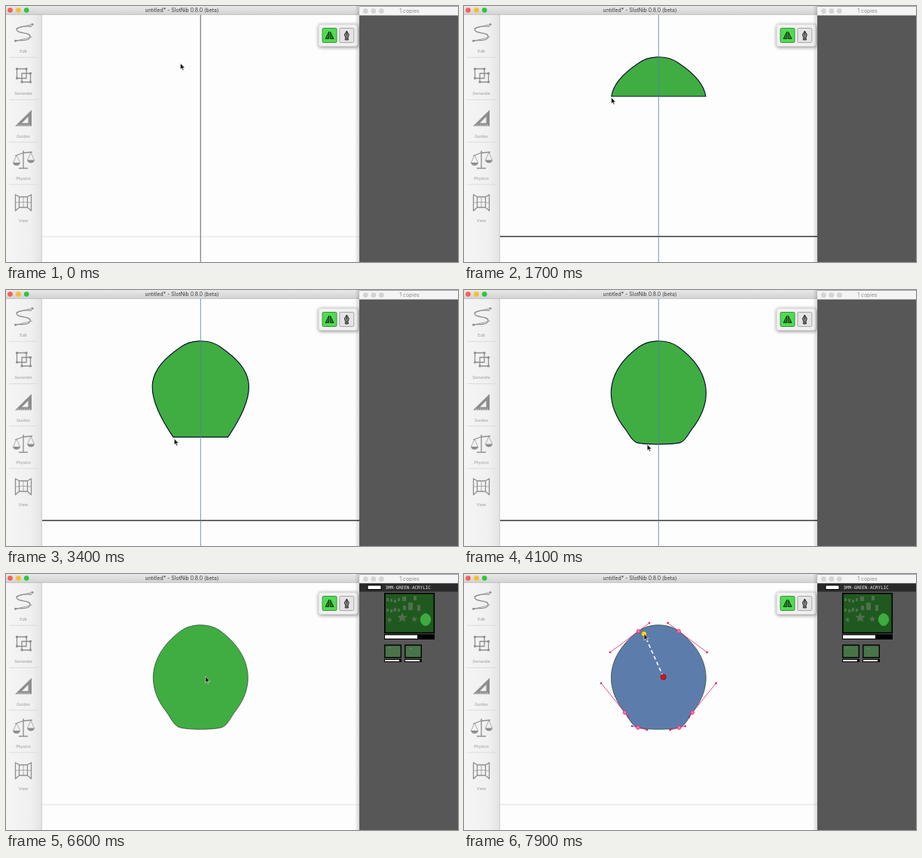
An HTML page for the animation above (8000 ms loop, 600x340 px).

```html
<!DOCTYPE html>
<html lang="en">
<head>
<meta charset="utf-8">
<title>Symmetric sketch</title>
<style>
  html, body { margin: 0; width: 100%; height: 100%; overflow: hidden; background: #fdfdfd; }
  svg { display: block; width: 600px; height: 340px; }
  text { font: 6.9px Inter, sans-serif; text-anchor: middle; }
  .labels text { font-size: 5.4px; fill: #999; }
  .icons { fill: none; stroke: #8e8e8e; stroke-width: 1.3; stroke-linejoin: round; }
  .icons .solid { fill: #8e8e8e; stroke: none; }
  .icons .thin { stroke-width: .7; }
  #stock text { font: 5.9px "DejaVu Sans Mono", monospace; text-anchor: start; fill: #f2f2f2; }
</style>
</head>
<body>
<svg viewBox="0 0 600 340">
  <defs>
    <linearGradient id="bar" x2="0" y2="1"><stop stop-color="#e8e8e8"/><stop offset="1" stop-color="#d2d2d2"/></linearGradient>
    <linearGradient id="side"><stop stop-color="#f5f5f5"/><stop offset=".7" stop-color="#f0f0f0"/><stop offset="1" stop-color="#e4e4e4"/></linearGradient>
    <linearGradient id="shade"><stop stop-color="#000" stop-opacity="0"/><stop offset="1" stop-color="#000" stop-opacity=".16"/></linearGradient>
    <filter id="blur" x="-20%" y="-30%" width="140%" height="160%"><feGaussianBlur stdDeviation="2.5"/></filter>
  </defs>

  <!-- sketch -->
  <rect width="600" height="340" fill="#fdfdfd"/>
  <path id="ground" d="M48 306.2H469"/>
  <path id="shape"/>
  <path id="axis" d="M258.3 11V340"/>
  <g id="handles" stroke="#d8236f" stroke-width=".8"></g>
  <g id="drag">
    <path id="dragLine" stroke="#fff" stroke-width="1.6" stroke-dasharray="5 3.5"/>
    <circle cx="264.7" cy="136.8" r="3.6" fill="#e01010" stroke="#501010" stroke-width=".6"/>
    <circle id="dragEnd" r="3.6" fill="#f4d81c" stroke="#6b5c10" stroke-width=".6"/>
  </g>

  <!-- main window -->
  <rect y="11" width="47" height="329" fill="url(#side)"/>
  <path d="M47.3 11V340" stroke="#c4c4c4" stroke-width=".9"/>
  <path d="M4 68.3H42M4 124.5H42M4 180.8H42M4 237H42" stroke="#d6d6d6" stroke-width=".8"/>
  <g class="labels">
    <text x="23" y="62">Edit</text><text x="23" y="118.2">Generate</text><text x="23" y="174.6">Guides</text>
    <text x="23" y="231">Physics</text><text x="23" y="287.3">View</text>
  </g>
  <g class="icons">
    <path d="M34 27C22 26 11 29 15 33S33 35 32 41 20 45 13 46"/>
    <path class="thin" d="M13 30L35 24M12 46.500L35 41"/>
    <g class="solid"><circle cx="35" cy="24.500" r="1.500"/><circle cx="12.500" cy="46.300" r="1.500"/></g>
    <path d="M14.500 83.500H27V96H14.500ZM21 89.500H32.500V101H21Z"/>
    <g class="solid" id="nodes"></g>
    <path class="solid" fill-rule="evenodd" d="M12 159.500L34 138V159.500ZM21 155.500H29.500V147Z"/>
    <path class="thin" stroke="#f2f2f2" d="M16 159.500V157.500M19 159.500V157.500M22 159.500V157.500M25 159.500V157.500M28 159.500V157.500M31 159.500V157.500"/>
    <path d="M23 192V215M17 215.500H29M12 199L23 195 35 194"/>
    <path class="thin" d="M14 198L9.500 208M14 198L18.500 208M33 194.500L28.500 204.500M33 194.500L37.500 204.500"/>
    <path class="solid" d="M9 208H19Q18 212 14 212T9 208ZM28 204.500H38Q37 208.500 33 208.500T28 204.500Z"/>
    <path d="M17.500 253.500H28.500V267.500H17.500ZM17.500 253.500L12.500 250.500V272L17.500 267.500M28.500 253.500L33.500 250.500V272L28.500 267.500"/>
    <path class="thin" d="M23 253.500V267.500M17.500 260.500H28.500M12.500 261H17.500M28.500 261H33.500"/>
  </g>
  <rect width="469" height="11.300" fill="url(#bar)"/>
  <path d="M0 11.500H469" stroke="#b5b5b5" stroke-width=".7"/>
  <circle cx="5.500" cy="5.600" r="3.300" fill="#f85e56"/>
  <circle cx="16.500" cy="5.600" r="3.300" fill="#fabc2e"/>
  <circle cx="27.200" cy="5.600" r="3.300" fill="#28c83f"/>
  <text x="233.500" y="8.100" fill="#3c3c3c">untitled* - SlotNib 0.8.0 (beta)</text>

  <!-- tool palette -->
  <rect x="415" y="25" width="53" height="30" rx="3" opacity=".45" filter="url(#blur)"/>
  <rect x="415" y="24.500" width="52" height="29" rx="3" fill="#f1f1f1" stroke="#d8d8d8" stroke-width=".6"/>
  <rect x="420" y="29.500" width="19" height="19" rx="1.500" fill="#4fdc52" stroke="#3d8f3f"/>
  <rect x="442.800" y="29.500" width="19" height="19" rx="1.500" fill="#e4e4e4" stroke="#a5a5a5"/>
  <path d="M428.700 34V43.500H424ZM430.300 34V43.500H435Z" fill="#2b7a2d" stroke="#12300f" stroke-width=".9"/>
  <path d="M452.300 33L455.300 38 454 42H450.600L449.300 38ZM450.300 43H454.300V45H450.300ZM452.300 34V39" fill="#888" stroke="#222" stroke-width=".9"/>

  <!-- cutting window -->
  <rect x="463" y="0" width="6" height="340" fill="url(#shade)"/>
  <rect x="469" width="131" height="340" fill="#575757"/>
  <rect x="469" y="0" width="131" height="12.500" fill="#f4f4f4"/>
  <path d="M469 .4H600" stroke="#777c90" stroke-width=".8"/>
  <g fill="#d4d4d4"><circle cx="477.300" cy="6.700" r="3.400"/><circle cx="487.800" cy="6.700" r="3.400"/><circle cx="498.300" cy="6.700" r="3.400"/></g>
  <text id="status" x="535.500" y="9.200" fill="#8a8a8a"></text>
  <g id="stock">
    <rect x="469" y="12.500" width="131" height="11" fill="#2a2a2a"/>
    <rect x="480" y="15" width="18" height="5.500" fill="#fff" stroke="#000"/>
    <text x="503.500" y="20.200">3MM-GREEN-ACRYLIC</text>
    <rect x="502.800" y="25.800" width="65.500" height="52.500" fill="#20591f" stroke="#000" stroke-width="1.600"/>
    <g id="offcuts" fill="#4e6f4d"></g>
    <path d="M557 52C552 53 549 58 550 62S554 69 557 69 563 66 564 62 562 53 557 52Z" fill="#3dab3e"/>
    <path d="M502 80H569V87H502ZM502 113H525V117H502ZM529 113H552V117H529Z"/>
    <path d="M503 81.300H546V85.800H503ZM503 114H522V116H503ZM530 114H549V116H530Z" fill="#fff"/>
    <path d="M502.800 94.500H524.300V111H502.800ZM529.800 94.500H551.300V111H529.800Z" fill="#487449" stroke="#000" stroke-width="1.400"/>
    <path d="M507 97h4v2h-4zM535 98h4v2h-4z" fill="#5b805b"/>
  </g>

  <path id="cursor" d="M0 0V8.300L1.900 6.600 3.200 9.500 4.600 8.900 3.300 6.100H5.900Z" fill="#111" stroke="#fff" stroke-width=".6"/>
</svg>

<script>
const LOOP = 8000, STEP = 100, AXIS = 258.3;
const DRAW = 800, RELEASE = 4200, PACK = 4900, PACKED = 6000, SELECT = 7000;
const START = [231.5, 76], TOP = [246, 65], GRAB = [264.7, 136.8];
const $ = id => document.getElementById(id);
const set = (id, attrs) => { for (const k in attrs) $(id).setAttribute(k, attrs[k]); };
const show = (id, on) => set(id, { visibility: on ? 'visible' : 'hidden' });
const mirror = ([x, y]) => [2 * AXIS - x, y];

// One side of the outline: two cubic segments and the handle of the bottom edge.
const stroke = (c1, c2, end) => [c1, c2, end, end, end, end, [end[0] + 8, end[1]]];
const FINAL = [[194, 104], [182, 145], [213.5, 184], [218, 190], [223, 202], [231, 204], [243, 207]];
const SIDE = [
  [DRAW, stroke(START, START, START)],
  [1700, stroke([212, 89], [198, 104], [195.7, 120])],
  [2600, stroke([198, 100], [187, 132], [201.5, 166.5])],
  [3400, stroke([190, 105], [178, 131], [222, 195.3])],
  [RELEASE, FINAL]
];
const POINTER = [
  [0, [[231.5, 76]]], [DRAW, [[231.5, 76]]], [1700, [[195.5, 121.5]]], [2600, [[201.7, 167]]],
  [3400, [[223.3, 197.5]]], [RELEASE, [[246, 206]]], [4700, [[246, 206]]], [5300, [[256, 152]]],
  [6300, [[264.7, 136]]], [SELECT, [[264.7, 136]]], [7900, [[239, 79.5]]]
];

function track(keys, t) {
  const i = keys.findIndex(([at]) => at > t);
  if (i === 0) return keys[0][1];
  if (i < 0) return keys.at(-1)[1];
  const [[t0, a], [t1, b]] = [keys[i - 1], keys[i]];
  const k = (t - t0) / (t1 - t0);
  return a.map((p, n) => p.map((v, m) => v + (b[n][m] - v) * k));
}

function outline(side) {
  const right = [mirror(TOP), TOP].map(p => p.join(' ')).join(' ');
  const back = [...side.slice(0, 6)].reverse().map(mirror);
  // back = end, c4, c3, knee, c2, c1 on the far side
  return `M${START}C${side.slice(0, 6).join(' ')}C${side[6]} ${mirror(side[6])} ${back[0]}` +
    `C${back[1]} ${back[2]} ${back[3]}C${back[4]} ${back[5]} ${mirror(START)}C${right} ${START}Z`;
}

function buildHandles() {
  const [c1, c2, knee, c3, c4, end, c5] = FINAL;
  const groups = [[START, TOP, c1], [knee, c2, c3], [end, c4, c5]];
  const dot = ([x, y], r, fill) => `<circle cx="${x}" cy="${y}" r="${r}" fill="${fill}"/>`;
  $('handles').innerHTML = [...groups, ...groups.map(g => g.map(mirror))].map(([p, a, b]) =>
    `<path d="M${a}L${p}L${b}" fill="none"/>` + dot(a, 1, '#a81c58') + dot(b, 1, '#a81c58') + dot(p, 2.4, '#f7a')
  ).join('');
}

function buildOffcuts() {
  const star = (x, y, r) => 'M' + Array.from({ length: 10 }, (_, i) => {
    const a = i * Math.PI / 5 - Math.PI / 2, d = i % 2 ? r * .45 : r;
    return [x + d * Math.cos(a), y + d * Math.sin(a)].map(v => v.toFixed(1));
  }).join('L') + 'Z';
  const box = (x, y, w, h) => `M${x} ${y}h${w}v${h}h${-w}Z`;
  const grid = Array.from({ length: 8 }, (_, i) => box(505 + i % 4 * 5, 32 + (i >> 2) * 13 + i % 3, 3, 4));
  const d = [...grid, star(526, 58, 7), star(509, 61, 4), star(542, 60, 4.5), star(516, 48, 3),
    box(526, 30, 5, 6), box(534, 38, 6, 10), box(541, 29, 4, 6), box(527, 42, 4, 6), box(546, 41, 4, 8)].join('');
  $('offcuts').innerHTML = `<path d="${d}"/>`;
}

function buildNodes() {
  const corners = [[14.5, 83.5], [27, 83.5], [14.5, 96], [32.5, 89.5], [21, 101], [32.5, 101]];
  $('nodes').innerHTML = corners.map(([x, y]) => `<rect x="${x - 1.4}" y="${y - 1.4}" width="2.8" height="2.8"/>`).join('');
}

function draw(now) {
  const t = Math.floor(now % LOOP / STEP) * STEP;
  const drawing = t >= DRAW && t < RELEASE, selected = t >= SELECT;
  const [[x, y]] = track(POINTER, t);

  set('ground', { stroke: drawing ? '#111' : '#dedede', 'stroke-width': drawing ? 1.3 : .9 });
  show('axis', t < RELEASE);
  set('axis', { stroke: drawing ? '#4d7fb0' : '#858585', 'stroke-width': drawing ? .8 : 1.3 });

  show('shape', t >= DRAW);
  set('shape', {
    d: outline(track(SIDE, t)), fill: selected ? '#5c7dac' : '#40ad42',
    stroke: drawing ? '#0c1430' : '#38453a', 'stroke-width': drawing ? 1.2 : .8
  });

  show('handles', selected);
  show('drag', selected);
  set('dragLine', { d: `M${GRAB}L${x} ${y}` });
  set('dragEnd', { cx: x, cy: y });

  $('status').textContent = t >= PACK && t < PACKED ? '[PACKING...]' : '1 copies';
  show('stock', t >= PACKED);
  set('cursor', { transform: `translate(${x} ${y})` });
  requestAnimationFrame(draw);
}

buildHandles();
buildOffcuts();
buildNodes();
draw(performance.now());
</script>
</body>
</html>
```
